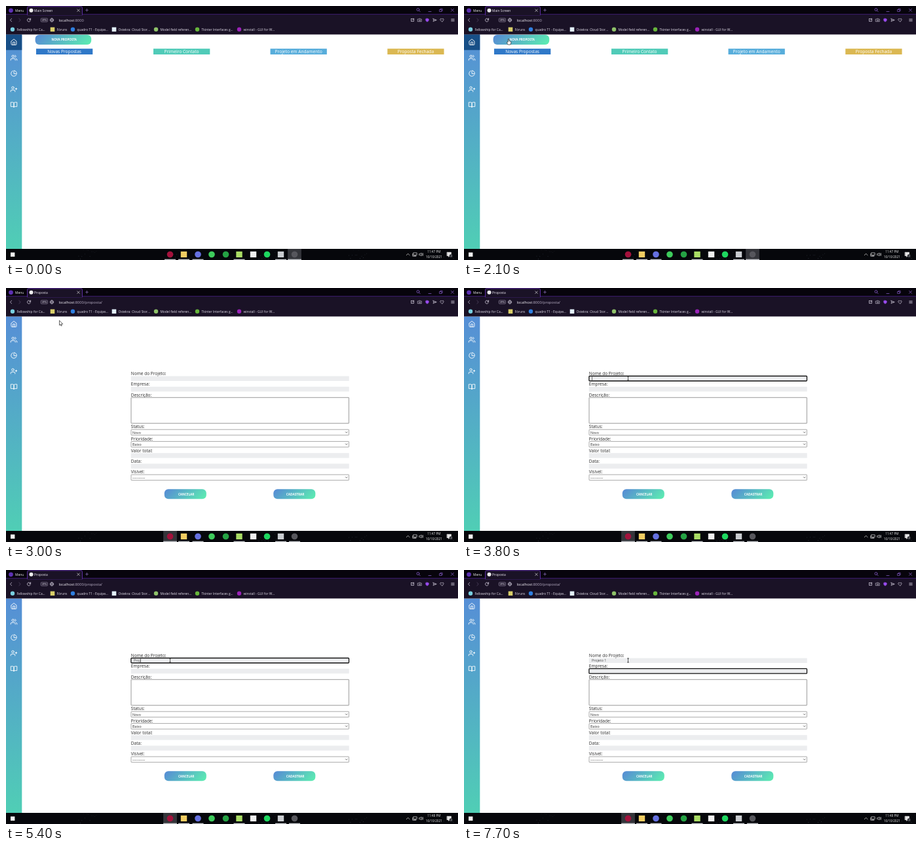
Recreate the animation shown at these times as an HTML page with a canvas. Size 690 by 388 pixels, loop 8 s.

```html
<!DOCTYPE html>
<html lang="pt">
<head>
<meta charset="utf-8">
<title>Proposta</title>
<style>
html, body { margin: 0; width: 100%; height: 100%; overflow: hidden; background: #fff; }
canvas { display: block; }
</style>
</head>
<body>
<canvas id="stage" width="690" height="388"></canvas>
<script>
const ctx = document.getElementById('stage').getContext('2d');
const LOOP = 8000, STEP = 100;
const SANS = '"Open Sans", "Noto Sans", sans-serif';
const CLICK = 2700, FORM = 3000, FOCUS = 3700, NEXT_FIELD = 7000, MINUTE = 4700;

// Cursor stops: time, x, y
const stops = [[1400, 664, 98], [2100, 68, 50], [2400, 83, 50], [2900, 83, 50],
  [3000, 81.5, 50], [3100, 81.5, 50], [3700, 250.5, 138]];
const typing = [[FOCUS, ''], [4400, 'P'], [4500, 'Pr'], [4700, 'Pro'], [5000, 'Proj'],
  [5600, 'Proje'], [5800, 'Projet'], [5900, 'Projeto'], [6400, 'Projeto '], [6600, 'Projeto 1']];

const sideIcons = [
  'M3 9l9-7 9 7v11a2 2 0 0 1-2 2H5a2 2 0 0 1-2-2zM9 22V12h6v10',
  'M17 21v-2a4 4 0 0 0-4-4H5a4 4 0 0 0-4 4v2M13 7a4 4 0 1 1-8 0a4 4 0 1 1 8 0M23 21v-2a4 4 0 0 0-3-3.87M16 3.13a4 4 0 0 1 0 7.75',
  'M21.21 15.89A10 10 0 1 1 8 2.83M22 12A10 10 0 0 0 12 2v10z',
  'M16 21v-2a4 4 0 0 0-4-4H5a4 4 0 0 0-4 4v2M12.5 7a4 4 0 1 1-8 0a4 4 0 1 1 8 0M20 8v6M23 11h-6',
  'M2 3h6a4 4 0 0 1 4 4v14a3 3 0 0 0-3-3H2zM22 3h-6a4 4 0 0 0-4 4v14a3 3 0 0 1 3-3h7z'
];
const bookmarks = [
  [10, '#79cfe0', 'Fellowship for Ca...'], [71, '#d9cf6a', 'Fóruns'],
  [102, '#2f7fe0', 'quadro T1 - Equipe...'], [165, '#e4f1fb', 'Ostekra: Cloud Stor...'],
  [229, '#8fc26a', 'Model field referen...'], [292, '#67b53c', 'Tkinter Interfaces g...'],
  [356, '#9a22b8', 'winstall - GUI for W...']
];
const columns = [[46, '#2f78c8', 'Novas Propostas'], [225, '#50cbb8', 'Primeiro Contato'],
  [403.5, '#57addb', 'Projeto em Andamento'], [582.3, '#dbb852', 'Proposta Fechada']];
// Taskbar apps: centre, colour, round, running
const apps = [[250.5, '#a3123c', 1, 1], [271.5, '#f2cd62', 0, 1], [293, '#6570e0', 1, 1],
  [314, '#3ecb5c', 1, 0], [335.5, '#25a244', 1, 0], [356, '#a9dc64', 0, 1],
  [377.5, '#f0f0f0', 0, 0], [398.5, '#1ed760', 1, 0], [419.5, '#c9ccd0', 0, 1], [440.5, '#56565c', 1, 1]];

function rect(x, y, w, h, fill) {
  ctx.fillStyle = fill;
  ctx.fillRect(x, y, w, h);
}
function round(x, y, w, h, r, fill, stroke, width = 1) {
  ctx.beginPath();
  ctx.roundRect(x, y, w, h, r);
  if (fill) { ctx.fillStyle = fill; ctx.fill(); }
  if (stroke) { ctx.strokeStyle = stroke; ctx.lineWidth = width; ctx.stroke(); }
}
function disc(x, y, r, fill) {
  ctx.fillStyle = fill;
  ctx.beginPath();
  ctx.arc(x, y, r, 0, 7);
  ctx.fill();
}
function path(d, x, y, stroke, width = 0.8, scale = 1, fill) {
  const shape = new Path2D(d);
  ctx.save();
  ctx.translate(x, y);
  ctx.scale(scale, scale);
  ctx.lineWidth = width / scale;
  ctx.lineCap = ctx.lineJoin = 'round';
  if (fill) { ctx.fillStyle = fill; ctx.fill(shape); }
  ctx.strokeStyle = stroke;
  ctx.stroke(shape);
  ctx.restore();
}
// y is the middle of the capital letters
function text(str, x, y, size, color, align = 'left', weight = 400, family = SANS) {
  ctx.font = `${weight} ${size}px ${family}`;
  ctx.textAlign = align;
  ctx.fillStyle = color;
  ctx.fillText(str, x, y + size * 0.357);
  return ctx.measureText(str).width;
}
function gradient(x0, y0, x1, y1, from, to) {
  const g = ctx.createLinearGradient(x0, y0, x1, y1);
  g.addColorStop(0, from);
  g.addColorStop(1, to);
  return g;
}
function button(x, y, w, label, size) {
  const m = x + w / 2, d = w / 4 + 4;
  round(x, y, w, 15, 6, gradient(m - d, y + 7.5 - d, m + d, y + 7.5 + d, '#5688d6', '#5cf0b0'));
  text(label, m + 1.3, y + 7.7, size, '#fff', 'center', 700);
}

function drawBrowser(t) {
  const loading = t >= CLICK && t < FORM;
  const onForm = t >= FORM;
  const pale = '#d6d0e0';
  rect(0, 0, 690, 13, '#07040c');
  rect(0, 13, 690, 30.5, '#1a1226');
  rect(0, 12.3, 690, 0.8, '#4a2488');
  round(32.5, 0.8, 84, 13, [2, 2, 0, 0], '#1a1226', '#6230ad', 0.9);
  rect(33, 12, 83, 2, '#1a1226');

  disc(7.5, 6.8, 3.4, '#5d31b4');
  text('Menu', 14, 7, 4.95, '#eee');
  if (loading) {
    const a = t / 160;
    ctx.strokeStyle = '#a99abf';
    ctx.lineWidth = 0.9;
    ctx.beginPath();
    ctx.arc(38.5, 6.7, 2.7, a, a + 4.5);
    ctx.stroke();
  } else disc(38.5, 6.7, 3, '#eee');
  text(loading ? 'localhost:8000/proposta/' : onForm ? 'Proposta' : 'Main Screen', 43, 6.8, 4.95, '#f2eef8');
  path('M-1.8-1.8L1.8 1.8M1.8-1.8L-1.8 1.8', 110.5, 6.7, '#ddd', 0.7);
  path('M-2 0H2M0-2V2', 123.5, 6.3, '#8d70bd', 0.7);

  const violet = '#8058c0';
  path('M2 0A2 2 0 1 1-2 0A2 2 0 1 1 2 0M1.5 1.5L3.3 3.3', 629, 5.5, violet);
  path('M-2 0H2', 647, 8.5, violet);
  path('M-2-1H1V2H-2zM-1-1V-2.2H2.2V1H1', 664, 6.5, violet, 0.7);
  path('M-2-2L2 2M2-2L-2 2', 681.5, 6.3, violet);

  path('M1.2-2.3L-1.2 0L1.2 2.3', 7.5, 21.5, '#c8c0d5');
  path('M-1.2-2.3L1.2 0L-1.2 2.3', 21, 21.5, '#554a66');
  if (loading) path('M-1.9-1.9L1.9 1.9M1.9-1.9L-1.9 1.9', 35, 21.5, pale);
  else path('M2.4-.6A2.5 2.5 0 1 0 2.2 1.2M2.6-2.6V-.5H.6', 35, 21.5, pale);
  round(53.3, 18.9, 10.2, 5.2, 1, null, '#aaa0b8', 0.6);
  text('VPN', 58.4, 21.6, 3.6, pale, 'center', 600);
  path('M2.7 0A2.7 2.7 0 1 1-2.7 0A2.7 2.7 0 1 1 2.7 0M-2.7 0H2.7M0-2.7C-1.8-1-1.8 1 0 2.7C1.8 1 1.8-1 0-2.7', 70, 21.5, pale, 0.6);
  const host = text('localhost', 80.5, 21.5, 5.7, '#f6f3fa');
  text(':8000' + (loading || onForm ? '/proposta/' : ''), 80.5 + host, 21.5, 5.7, '#b9b0c6');

  path('M-2-2H0M-2-2V2H2V0M-.5.5L2.2-2.2M.5-2.2H2.2V-.5', 620.5, 21.5, pale, 0.7);
  path('M-2.8-1.5H-1.2L-.7-2.3H.7L1.2-1.5H2.8V2.2H-2.8zM1 .4A1 1 0 1 1-1 .4A1 1 0 1 1 1 .4', 631.5, 21.5, pale, 0.6);
  path('M0-2.4L2.2-1.6V.3Q2 1.8 0 2.6Q-2 1.8-2.2.3V-1.6z', 643, 21.5, '#9a4cf0', 0.7, 1, '#9a4cf0');
  path('M-2.5-2.3L2.8 0L-2.5 2.3L-1.7 0zM-1.7 0H2', 654.5, 21.5, pale, 0.6);
  path('M0 2.5L-2.3.2Q-3.2-1.2-2-2.1Q-.7-2.6 0-1.2Q.7-2.6 2-2.1Q3.2-1.2 2.3.2z', 665.5, 21.5, pale, 0.7);
  path('M-2.2-1.7H2.2M-2.2 0H2.2M-2.2 1.7H2.2', 682, 21.5, pale, 0.7);

  bookmarks.forEach(([x, color, label], i) => {
    if (i === 1 || i === 3) rect(x - 3.3, 32.5, 6.6, 6.6, color);
    else disc(x, 35.8, 3.2, color);
    text(label, x + 6.4, 36, 4.95, '#e4dfeb');
  });
}

function drawSidebar(t) {
  rect(0, 43.5, 24.3, 327.5, gradient(0, 43, 0, 371, '#568ed6', '#50ceb5'));
  if (t < FORM) rect(0, 43.5, 24.3, 23.8, '#174f87');
  sideIcons.forEach((d, i) => path(d, 6.8, 49.8 + i * 24, '#fff', 0.9, 0.435));
}

function drawBoard() {
  button(44.6, 44, 85.6, 'NOVA PROPOSTA', 4.55);
  for (const [x, color, label] of columns) {
    rect(x, 65.2, 86.3, 8.8, color);
    text(label, x + 43.1, 70, 6.65, '#fff', 'center');
  }
}

function drawForm(t) {
  const label = (str, y) => text(str, 190.8, y, 6.55, '#2b2b2b');
  const input = (y, focused) => {
    rect(190.7, y, 333, 7.4, '#ecedef');
    if (focused) round(190.9, y - 0.1, 332.6, 7.5, 1, null, '#111', 1.3);
  };
  const select = (y, value, family = SANS, size = 5.3) => {
    round(191, y, 332.4, 8.6, 0.6, '#fff', '#858585', 0.7);
    text(value, 193, y + 4.6, size, '#333', 'left', 400, family);
    path('M-1.4-.7L0 .7L1.4-.7', 519.7, y + 4.3, '#333', 0.7);
  };
  label('Nome do Projeto:', 130.6);
  input(134.6, t >= FOCUS && t < NEXT_FIELD);
  label('Empresa:', 147);
  input(150.8, t >= NEXT_FIELD);
  label('Descrição:', 163.3);
  round(191, 167.3, 332.4, 39.4, 0.4, '#fff', '#808080', 0.8);
  label('Status:', 212);
  select(216.2, 'Novo');
  label('Prioridade:', 230.2);
  select(234.4, 'Baixo');
  label('Valor total:', 248.4);
  input(252.2);
  label('Data:', 264.8);
  input(268.4);
  label('Visível:', 281.1);
  select(285.1, '---------', '"DejaVu Sans", sans-serif', 6);
  button(241.8, 307.3, 64, 'CANCELAR', 4.65);
  button(408.3, 307.3, 64, 'CADASTRAR', 4.7);

  const typed = typing.filter(([at]) => t >= at).pop();
  if (!typed) return;
  const width = text(typed[1], 195, 138.6, 5.3, '#444');
  const next = t >= NEXT_FIELD;
  const since = t - (next ? NEXT_FIELD : typed[0]);
  if (since % 1000 < 500) rect(next ? 195 : 195.2 + width, next ? 151.8 : 135.5, 0.6, 5.6, '#222');
}

function drawTaskbar(t) {
  rect(0, 371, 690, 17, '#06070b');
  for (let i = 0; i < 60; i++) {
    const rnd = Math.abs(Math.sin(i * 91.7) * 4375.5) % 1;
    rect((i * 137.51) % 690, 371.5 + rnd * 15, 0.7, 0.7, `rgba(150,165,190,${0.15 + rnd * 0.4})`);
  }
  rect(7, 376.5, 6.4, 6.4, '#f4f4f4');
  const active = t < CLICK ? apps.length - 1 : 0;
  apps.forEach(([x, color, isRound, running], i) => {
    const on = i === active;
    if (on) rect(x - 10.4, 371, 20.8, 17, '#34353a');
    if (running) rect(x - (on ? 10.4 : 8.5), 386.7, on ? 20.8 : 17, 1.3, '#c4c6ca');
    if (isRound) disc(x, 379.5, 4.8, color);
    else rect(x - 4.7, 375, 9.4, 9, color);
  });
  const white = '#e6e6e6';
  path('M-2.4 1.2L0-1.2L2.4 1.2', 613.7, 379.5, white, 0.7);
  path('M-2-2.5H3.2V1H-2zM.6 1V2.7M-1 2.7H2.2M-3.2-.7V2.7H-1', 624, 379.5, white, 0.7);
  path('M-3-1H-1.7L0-2.5V2.5L-1.7 1H-3zM1.2-1.2Q2 0 1.2 1.2M2.3-2.1Q3.7 0 2.3 2.1', 634, 379.5, white, 0.6);
  text(t < MINUTE ? '11:47 PM' : '11:48 PM', 653.4, 375.8, 4.75, white, 'center');
  text('10/10/2021', 653.4, 383.3, 4.75, white, 'center');
  path('M-3-3.2H3V2H1L-.8 3.8V2H-3z', 676.5, 379.5, white, 0.8, 1, white);
  disc(679.5, 382, 2.7, '#23252b');
  text('2', 679.5, 382, 3.8, '#fff', 'center');
}

function drawStatus() {
  round(-1, 359.5, 71, 12, [0, 2, 0, 0], '#fcfcfc', '#e0e0e0', 0.7);
  text('localhost:8000/proposta/', 3, 365.5, 5.3, '#bcbcbc');
}

function cursorAt(t) {
  let i = stops.findIndex(([at]) => at > t);
  if (i < 0) return stops[stops.length - 1].slice(1);
  const [t0, x0, y0] = stops[i - 1], [t1, x1, y1] = stops[i];
  const k = (t - t0) / (t1 - t0), e = k * k * (3 - 2 * k);
  return [x0 + (x1 - x0) * e, y0 + (y1 - y0) * e];
}

function drawCursor(t) {
  if (t < stops[0][0]) return;
  const [x, y] = cursorAt(t);
  const inside = (x0, y0, x1, y1) => x > x0 && x < x1 && y > y0 && y < y1;
  if (t < FORM && inside(45, 44, 130, 59)) {
    path('M-.8 4.8V.7Q0-.4.8.7V3.4L3.6 4.3Q4 4.7 3.8 6.2L3 9H-.8L-2.6 6.2Q-2.9 5-1.9 5.2z', x, y, '#222', 0.7, 1, '#fff');
  } else if (t >= FORM && inside(191, 134, 524, 142)) {
    path('M-1.1-3H1.1M0-3V3M-1.1 3H1.1', x, y, '#222', 0.7);
  } else {
    path('M0 0V7L1.6 5.5L2.7 8L3.8 7.5L2.7 5.1H4.9z', x, y, '#222', 0.7, 1, '#fff');
  }
}

function draw(t) {
  rect(0, 0, 690, 388, '#fff');
  drawSidebar(t);
  if (t < FORM) drawBoard();
  else drawForm(t);
  if (t >= 2200 && t < FORM) drawStatus();
  drawBrowser(t);
  drawTaskbar(t);
  drawCursor(t);
}

function frame() {
  const t = performance.now() % LOOP;
  draw(Math.floor(t / STEP) * STEP);
  requestAnimationFrame(frame);
}
frame();
</script>
</body>
</html>
```
